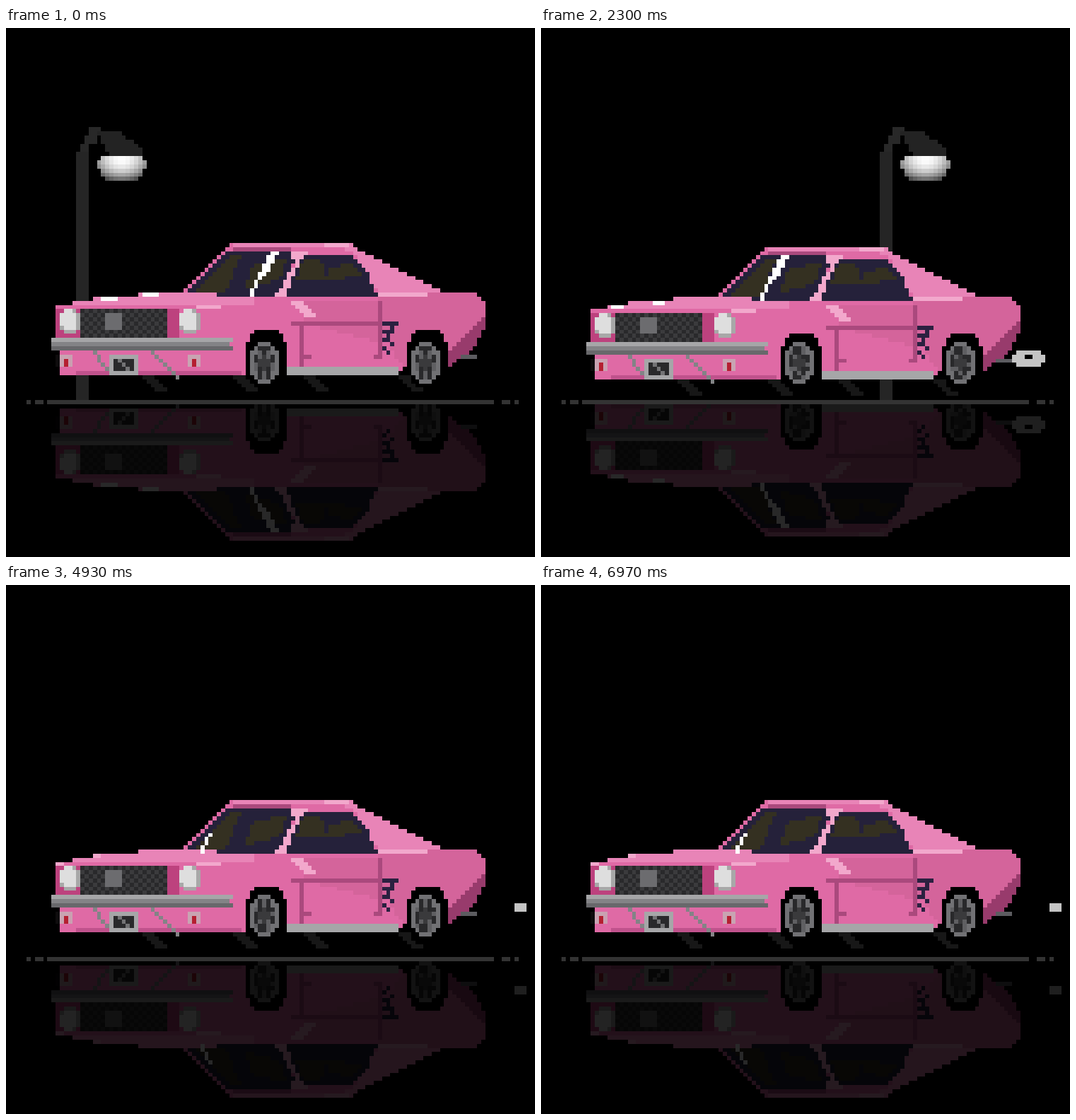
These frames come from a looping animation (748 by 748 pixels, 7000 ms). An HTML page with a canvas:

```html
<!DOCTYPE html>
<html lang="en">
<head>
<meta charset="utf-8">
<title>Pink coupe at night</title>
<style>
html, body { margin: 0; width: 100%; height: 100%; overflow: hidden; background: #000; }
canvas { display: block; width: 100vw; height: 100vh; image-rendering: pixelated; }
</style>
</head>
<body>
<canvas id="stage" width="128" height="128"></canvas>
<script>
const SIZE = 128, GROUND = 90, MIRROR = 176, CYCLE = 500;
const PINK = '#df6aa5', SIDE = '#d4649b', LIGHT = '#e884b7', PALE = '#f2a8cc',
  SEAM = '#aa497d', DARK = '#983b6c', GLASS = '#25213a', OLIVE = '#343021',
  CHROME = '#a6a6a8', STEEL = '#838386', SHADE = '#29292b', BLACK = '#000', WHITE = '#fff';

const stage = document.getElementById('stage').getContext('2d');
const layerCanvas = document.createElement('canvas');
layerCanvas.width = layerCanvas.height = SIZE;
const layer = layerCanvas.getContext('2d');

function box(g, color, x, y, w, h = 1) {
  g.fillStyle = color;
  g.fillRect(x, y, w, h);
}

// Fills the pixels whose centres lie between two edges.
function span(g, color, y, left, right) {
  const a = Math.ceil(left - 0.5), b = Math.ceil(right - 0.5);
  if (b > a) box(g, color, a, y, b - a);
}

function poly(g, color, ...pts) {
  const n = pts.length;
  for (let y = 0; y < SIZE; y++) {
    const cy = y + 0.5, cuts = [];
    pts.forEach(([x1, y1], i) => {
      const [x2, y2] = pts[(i + 1) % n];
      if ((y1 <= cy) !== (y2 <= cy)) cuts.push(x1 + (cy - y1) / (y2 - y1) * (x2 - x1));
    });
    cuts.sort((a, b) => a - b);
    for (let i = 0; i + 1 < cuts.length; i += 2) span(g, color, y, cuts[i], cuts[i + 1]);
  }
}

function oval(g, color, cx, cy, rx, ry) {
  for (let y = Math.floor(cy - ry); y <= cy + ry; y++) {
    const k = 1 - ((y + 0.5 - cy) / ry) ** 2;
    if (k > 0) span(g, color, y, cx - rx * Math.sqrt(k), cx + rx * Math.sqrt(k));
  }
}

// A diagonal bar, one row per unit of length.
function bar(g, color, x, y, length, slope, width) {
  for (let i = 0; i < length; i++) box(g, color, Math.round(x + i * slope), y + i, width);
}

// The bonnet rises in steps towards the windscreen.
const bonnetTop = x => x < 16 ? 67 : x < 21 ? 66 : x < 32 ? 65 : 64;

function drawShell(g) {
  // Cabin, main body and tail
  poly(g, PINK, [55, 52], [83, 52], [86, 54], [106, 64], [43, 64], [54, 53]);
  poly(g, LIGHT, [78, 52], [83, 52], [86, 54], [106, 64], [90, 64], [84, 54]);
  box(g, LIGHT, 55, 52, 28);
  box(g, PALE, 77, 52, 6);
  box(g, SEAM, 55, 53, 14);
  for (let x = 12; x < 60; x++) {
    const top = bonnetTop(x);
    box(g, PINK, x, top, 1, 84 - top);
    box(g, LIGHT, x, top, 1, 67 - top);
  }
  box(g, PINK, 60, 64, 36, 19);
  poly(g, SIDE, [90, 64], [114, 64], [116, 66], [116, 72], [107, 82], [96, 82], [90, 72]);
  poly(g, DARK, [116, 70], [116, 72], [113, 78], [107, 82], [107, 79]);
  box(g, PALE, 90, 64, 12);
  box(g, PALE, 46, 67, 6);
  box(g, BLACK, 11, 78, 2, 6);

  // Door and sill
  box(g, SIDE, 72, 66, 18, 5);
  poly(g, SIDE, [74, 72], [90, 72], [90, 76]);
  box(g, SEAM, 69, 71, 24);
  box(g, SEAM, 71, 72, 1, 10);
  box(g, SEAM, 90, 66, 1, 14);
  box(g, SEAM, 72, 79, 18);
  box(g, PINK, 74, 79, 15);
  bar(g, PALE, 69, 66, 4, 1, 3);
  box(g, CHROME, 68, 82, 27, 2);
  box(g, '#5c5c60', 110, 79, 4);
  for (let i = 0; i < 4; i++) {
    box(g, '#2b2040', 91, 71 + 2 * i, 4 - i);
    box(g, '#2b2040', 93 - i % 2, 72 + 2 * i, 1);
  }
}

function drawGlass(g, glare) {
  poly(g, GLASS, [54, 54], [69, 54], [70, 56], [66, 65], [59, 65], [44, 64]);
  poly(g, OLIVE, [55, 55], [57, 55], [53, 64], [46, 64]);
  poly(g, OLIVE, [60, 57], [68, 56], [66, 61], [58, 63]);
  poly(g, PALE, [69, 54], [73, 54], [68, 65], [65, 65], [70, 57]);
  poly(g, GLASS, [72, 55], [84, 55], [87, 58], [90, 65], [68, 65], [69, 61]);
  poly(g, OLIVE, [72, 56], [76, 56], [78, 61], [70, 61]);
  poly(g, OLIVE, [78, 58], [84, 57], [86, 60], [78, 61]);

  for (let y = 54; y < 65; y++) {
    const x = Math.floor(glare + (64 - y) * 0.5);
    if (x > 108 - y) box(g, WHITE, x, y, y < 60 ? 2 : 1);
  }
}

function drawFront(g) {
  box(g, '#bd427e', 12, 68, 30, 7);
  for (let y = 68; y < 75; y++)
    for (let x = 18; x < 39; x++)
      box(g, (x + y) % 2 ? '#3b3b3d' : SHADE, x, y, 1);
  box(g, '#6c6c6f', 24, 69, 4, 4);
  // Bumper, apron and plate
  [CHROME, STEEL, '#68686b'].forEach((c, i) => box(g, c, 11, 75 + i, 44 - i % 2));
  box(g, '#c0528c', 17, 83, 40);
  bar(g, STEEL, 21, 78, 6, 0.7, 1);
  bar(g, STEEL, 35, 78, 7, 1, 1);
  box(g, CHROME, 25, 79, 7, 5);
  box(g, SHADE, 26, 80, 5, 3);
  bar(g, '#737375', 27, 80, 3, 1, 1);
  // Lights
  for (const x of [13, 42]) {
    oval(g, '#a8a8a8', x + 2.5, 71, 2.6, 3.1);
    oval(g, '#dedede', x + 2.2, 70.7, 2, 2.5);
    box(g, '#c9a4b2', x + x / 14 - 1, 79, 3, 3);
    box(g, '#b51f31', Math.round(x + x / 14), 80, 1, 2);
  }
}

function drawWheel(g, cx, cy, spin) {
  oval(g, BLACK, cx, cy, 4.5, 6);
  oval(g, '#717174', cx, cy, 3.6, 5);
  oval(g, SHADE, cx, cy, 2.6, 3.9);
  for (let i = 0; i < 5; i++) {
    const a = spin + i * Math.PI * 0.4;
    for (let r = 0.4; r < 1; r += 0.25)
      box(g, '#5f5f62', Math.floor(cx + Math.cos(a) * 2.7 * r), Math.floor(cy + Math.sin(a) * 4 * r), 1);
  }
  oval(g, '#3a3a3c', cx, cy, 1.1, 1.6);
}

// A puff forms, opens into a ring, breaks into a wave and fades out.
function drawSmoke(g, step) {
  const grey = '#c4c4c4';
  if (step === 1) oval(g, grey, 115, 80, 2.5, 1.5);
  if (step === 2) {
    oval(g, grey, 118, 80, 4, 2.2);
    box(g, BLACK, 117, 79, 2);
  }
  if (step === 3)
    for (let x = 117; x < 125; x++)
      box(g, grey, x, Math.round(79 - Math.sin((x - 119) * 1.8)), 1, 2);
  if (step === 4) oval(g, grey, 124.5, 78, 1.6, 1.1);
}

function drawCar(g, step) {
  const body = Math.round(Math.sin(step * Math.PI / 4));
  const wheelY = 81 - Math.floor(step / 4);
  const glare = 59 - 3 * step;
  g.clearRect(0, 0, SIZE, SIZE);
  g.save();
  g.translate(0, body);
  drawShell(g);
  drawFront(g);
  drawGlass(g, glare);
  for (const gap of [36, 26]) {
    const x = Math.max(12, glare - gap);
    box(g, step < 3 ? WHITE : PALE, x, bonnetTop(x), 4 - Math.floor(step / 2));
  }
  for (const cx of [63, 102]) oval(g, BLACK, cx, 80, 5.5, 7.3);
  g.restore();
  for (const cx of [62.5, 101.5]) drawWheel(g, cx, wheelY, step * 0.5 + 0.3);
  drawSmoke(g, step);
  return body;
}

function drawLamp(g, dx) {
  g.save();
  g.translate(Math.round(dx), 0);
  box(g, '#252525', 17, 30, 3, GROUND - 30);
  for (let i = 0; i < 3; i++) box(g, '#282828', 18 + i, 28 - 2 * i, 2 + i % 2, 2);
  box(g, '#282828', 20, 24, 3);
  poly(g, '#232323', [22, 25], [27, 25], [33, 29], [33, 31], [25, 31]);
  // The glow is brightest at the top centre of the bulb.
  for (let y = 31; y < 37; y++) {
    const half = Math.round(6 * Math.sqrt(1 - ((y - 32) / 5) ** 2) - (y === 31 ? 1 : 0));
    for (let x = -half; x < half; x++) {
      const v = Math.round(255 - 110 * ((x + 0.5) / 6) ** 2 - 5.5 * (y - 31) ** 2);
      box(g, `rgb(${v},${v},${v})`, 28 + x, y, 1);
    }
  }
  g.restore();
}

function drawGround(g, body) {
  for (const x of [33, 55, 72, 95]) bar(g, '#171717', x, 84 + body, 4, 1, 3);
  box(g, '#333', 10, GROUND, 108);
  for (const [x, w] of [[5, 1], [7, 2]]) {
    box(g, '#333', x, GROUND, w);
    box(g, '#333', 129 - x - w, GROUND, w);
  }
}

function drawReflection(g) {
  g.save();
  g.beginPath();
  g.rect(0, GROUND + 1, SIZE, SIZE);
  g.clip();
  g.globalAlpha = 0.155;
  g.translate(0, MIRROR);
  g.scale(1, -1);
  g.drawImage(layerCanvas, 0, 0);
  g.restore();
}

let shown = -1;
function tick() {
  const t = performance.now() % CYCLE;
  const step = Math.max(0, Math.floor((t - 30) / 100));
  if (step !== shown) {
    shown = step;
    const body = drawCar(layer, step);
    box(stage, BLACK, 0, 0, SIZE, SIZE);
    drawLamp(stage, 27.5 * step + 2.5 * step * step);
    drawReflection(stage);
    drawGround(stage, body);
    stage.drawImage(layerCanvas, 0, 0);
  }
  requestAnimationFrame(tick);
}
tick();
</script>
</body>
</html>
```
